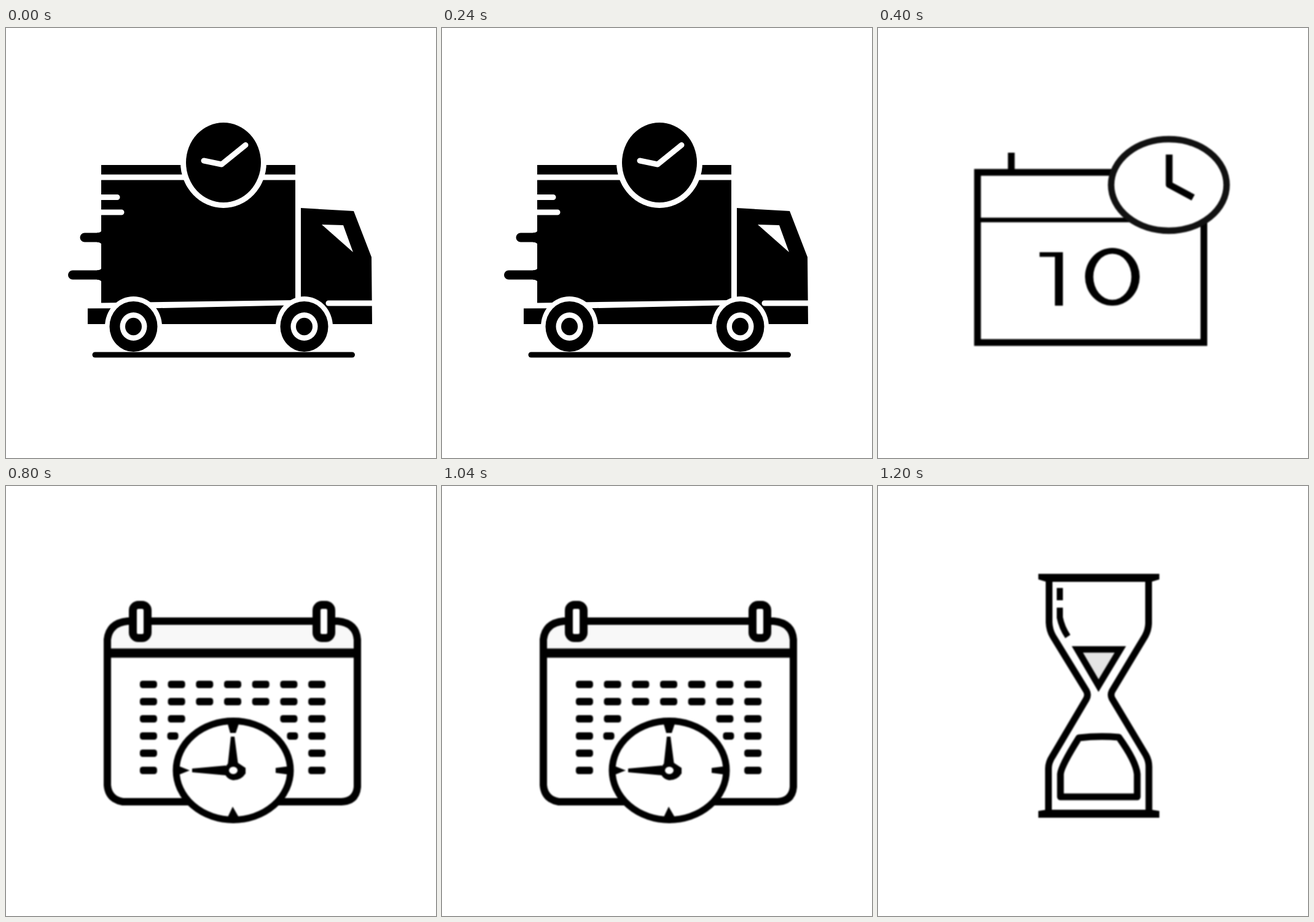
An HTML page that plays this animation: 700x700 px, repeating every 1600 ms.

```html
<!DOCTYPE html>
<html lang="en">
<head>
<meta charset="utf-8">
<title>Delivery time icons</title>
<style>
  html, body { margin: 0; width: 100%; height: 100%; overflow: hidden; background: #fff; }
  svg { display: block; width: 100vw; height: 100vh; }
  .scene { visibility: hidden; animation: show 1.6s step-end infinite; animation-delay: calc(var(--slot) * .4s - 1.6s); }
  .soft { filter: blur(1.3px); }
  .line { fill: none; stroke: #000; stroke-width: var(--w, 11); }
  .round { stroke-linecap: round; stroke-linejoin: round; }
  .white { stroke: #fff; --w: 9; }
  .paper { fill: #fff; }
  @keyframes show {
    0% { visibility: visible; }
    25%, 100% { visibility: hidden; }
  }
</style>
</head>
<body>
<svg viewBox="0 0 700 700">
  <defs>
    <g id="wheel">
      <ellipse rx="46.5" ry="49" class="paper"/>
      <ellipse rx="39" ry="41"/>
      <ellipse rx="22" ry="23" class="paper"/>
      <ellipse rx="13.5" ry="14.3"/>
    </g>
    <rect id="ring" x="-12" y="193.5" width="24" height="54" rx="9" class="line paper" style="--w:13"/>
  </defs>

  <!-- Truck -->
  <g class="scene" style="--slot:0">
    <path d="M155 223H471V443L155 447.5ZM480 293 566 298 595 373 596 482H133V456.5L250 456 480 451Z"/>
    <path class="line round" style="--w:15" d="M128 341H150M108.5 402H150"/>
    <path d="M148 333.5Q155 333 156 329V353Q155 349 148 348.5ZM148 394.5Q155 394 156 390V414Q155 410 148 409.5Z"/>
    <path class="line white" d="M154 243H472"/>
    <path class="line white round" d="M150 275.5H181M150 300H188M525 448H600"/>
    <path class="paper" d="M514 320 549 321 565 365Z"/>
    <use href="#wheel" x="207.5" y="486"/>
    <use href="#wheel" x="485.5" y="486"/>
    <ellipse cx="354" cy="219" rx="70" ry="74" class="paper"/>
    <ellipse cx="354" cy="219" rx="61" ry="65"/>
    <path class="line white round" d="M322 216 351 222 390 190.5"/>
    <path class="line round" style="--w:9" d="M145 532H563.5"/>
  </g>

  <!-- Calendar page -->
  <g class="scene soft" style="--slot:1">
    <path class="line" d="M162 235H530.5V512H162Z"/>
    <path class="paper" d="M473 225H560V314H473Z"/>
    <path class="line" style="--w:7.5" d="M162 312.5H525"/>
    <path class="line" style="--w:11" d="M217 203V234"/>
    <ellipse cx="473.5" cy="255.5" rx="94" ry="74.5" class="line paper" style="--w:10.5;stroke:#111"/>
    <path class="line" style="--w:11;stroke-linejoin:round" d="M474 206V255L513 276"/>
    <path d="M263 365H301V452H288V372.5H263Z"/>
    <path fill-rule="evenodd" d="M337 405a44.5 47 0 1 0 89 0a44.5 47 0 1 0-89 0ZM350.5 405a31 37.5 0 1 1 62 0a31 37.5 0 1 1-62 0Z"/>
  </g>

  <!-- Month planner -->
  <g class="scene soft" style="--slot:2">
    <path fill="#f8f8f8" d="M165 270V250Q168 222 198 220H540Q570 222 572 250V270Z"/>
    <g id="days"></g>
    <path class="line" style="--w:12" d="M198 220H540Q570 223 572 250V490Q570 513 546 514H190Q167 510 165 487V250Q168 223 198 220Z"/>
    <path class="line" style="--w:15" d="M165 272H572"/>
    <use href="#ring" x="218.5"/>
    <use href="#ring" x="517.5"/>
    <ellipse cx="370" cy="463" rx="93" ry="80.5" class="line paper"/>
    <path d="M360 384H380L374 402H365ZM439 459 462 456V470L439 467ZM369 522 380 541H360ZM279 455 299 463 279 471Z"/>
    <path d="M303 460 358 455V471L303 466ZM366 408H372L378 454H361Z"/>
    <path d="M355 463Q360 448 372 447L390 459V468Q383 479 370 479Q357 477 355 463Z"/>
    <ellipse cx="370" cy="463" rx="7" ry="6" class="paper"/>
  </g>

  <!-- Hourglass -->
  <g class="scene soft" style="--slot:3">
    <path d="M261 143H458V152L445 156H274L261 152ZM261 540H458V529L445 527H274L261 529Z"/>
    <path class="line" d="M278.5 150V222Q279 235 285 245L339 333Q343 340 339 347L284 440Q277.5 450 277.5 460V532M440.5 150V224Q440 235 435 244L381 334Q378 340 381 346L436 438Q441 447 441 457V532"/>
    <path class="line" style="--w:10" d="M296 166V186M296 198V214Q299 230 309 245"/>
    <path class="line" style="--w:10.5;fill:#e4e4e4" d="M324.5 266H394.5L359 325Z"/>
    <path class="line" style="stroke-linejoin:round" d="M297 506V469Q298 456 327 410Q360 406 392 409Q420 448 422 469V506Z"/>
  </g>
</svg>
<script>
  // "#" is a full dash, "+" a short one beside the clock
  const weeks = ["#######", "#######", "##   ##", "#+   +#", "#     #", "#     #"];
  const dash = (x, y, width) =>
    `<rect x="${x - width / 2}" y="${y - 6}" width="${width}" height="12" rx="4.5"/>`;

  const day = (mark, column, row) => {
    const x = 369 + (column - 3) * 45.7, y = 323 + row * 28;
    if (mark === "#") return dash(x, y, 28);
    if (mark === "+") return dash(x + Math.sign(column - 3) * 6, y, 18);
    return "";
  };

  document.getElementById("days").innerHTML = weeks.map((week, row) =>
    [...week].map((mark, column) => day(mark, column, row)).join("")
  ).join("");
</script>
</body>
</html>
```
